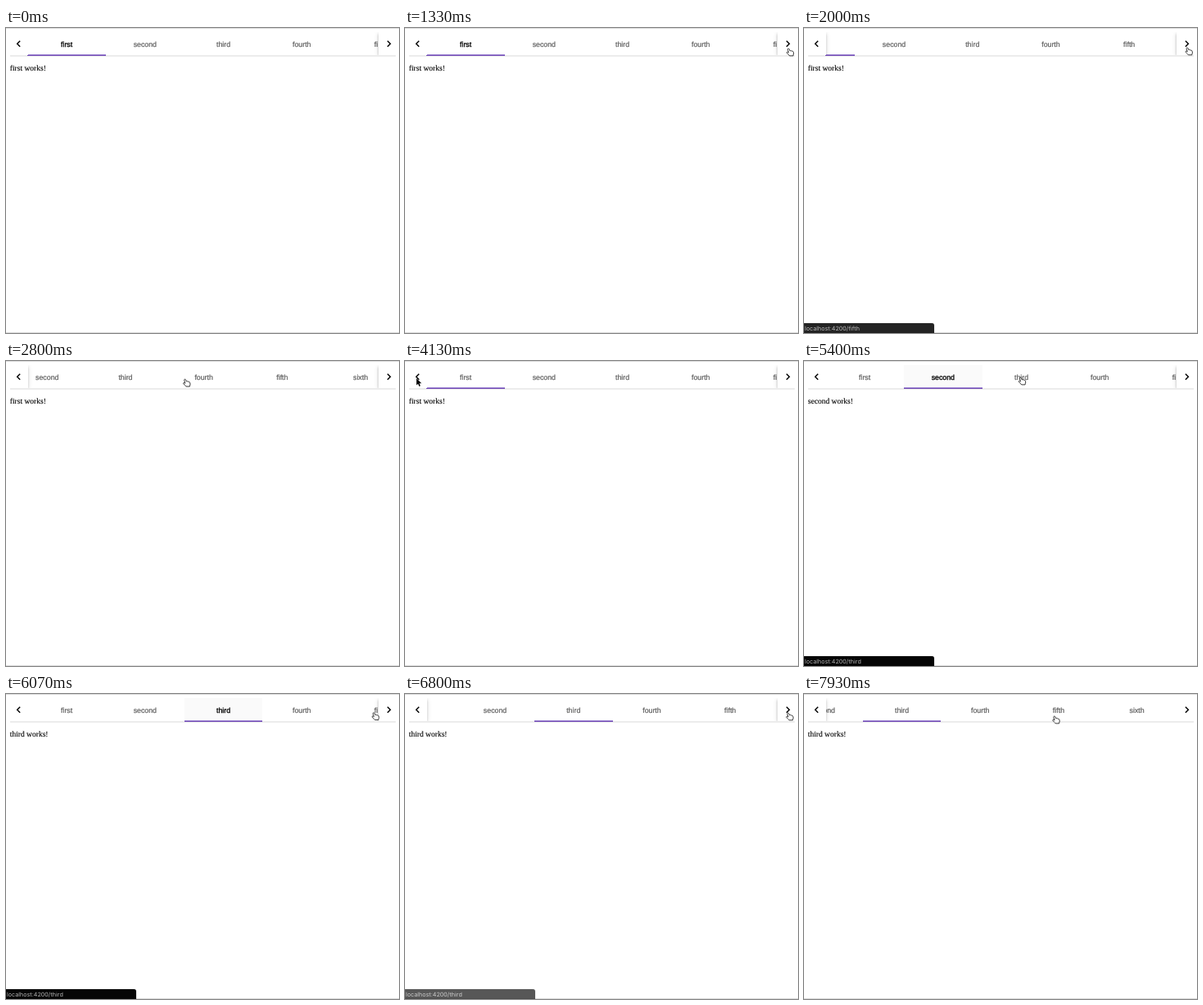
Animation, 480 px wide and 372 px high, one loop 8 s. Source, as an HTML page:

```html
<!DOCTYPE html>
<html lang="en">
<head>
<meta charset="utf-8">
<title>Scrolling tabs</title>
<style>
html, body { margin: 0; width: 100%; height: 100%; overflow: hidden; background: #fff; }
body { position: relative; text-rendering: geometricPrecision; }
body > div, svg, .tab, #ink { position: absolute; }
.rule { left: 0; width: 480px; height: 1px; background: #dcdcdc; }
#header { left: 5px; top: 5px; width: 471px; height: 30px; overflow: hidden; }
#header::after { content: ""; position: absolute; left: 0; right: 0; bottom: 0; height: 2px; background: #ececec; }
#view { position: absolute; left: 21.3px; top: 0; width: 428px; height: 29px; overflow: hidden; z-index: 1; }
#list { position: absolute; left: 0; top: 0; height: 29px; }
.tab { top: 0; width: 95.7px; height: 28px; text-align: center; color: #5e5e5e;
  font: 8.8px/30px "Liberation Sans", Arial, sans-serif; -webkit-text-stroke: .22px; }
.tab.focus { color: #000; -webkit-text-stroke: .32px; }
.tab.tint { background: #fafafa; }
#ink { left: 0; top: 27px; width: 95.7px; height: 2px; background: linear-gradient(#a58fd5 50%, #7048b5 50%); }
.pager { position: absolute; top: 0; width: 21.5px; height: 28px; background: #fff; z-index: 2; clip-path: inset(0 -8px); }
.pager.raised { box-shadow: 0 1.2px 2.4px -.6px rgba(0,0,0,.2), 0 2.4px 3px rgba(0,0,0,.14), 0 .6px 6px rgba(0,0,0,.12); }
#prev { left: 0; }
#next { right: 0; }
#art { left: 0; top: 0; z-index: 5; }
#page { left: 4.8px; top: 43.6px; font: 9.5px/12px "Liberation Serif", "Times New Roman", serif; color: #000;
  -webkit-text-stroke: .12px; white-space: pre; }
#status { left: 0; top: 360px; width: 159px; height: 12px; border-radius: 0 3px 0 0; background: #050505;
  box-shadow: 0 0 1px rgba(0,0,0,.5); color: #b4b4b4; font: 7.2px/13px Inter, "Open Sans", sans-serif; text-indent: 1px; z-index: 3; }
</style>
</head>
<body>
<div class="rule" style="top:0"></div>
<div class="rule" style="top:371px"></div>
<div id="header">
  <div id="view"><div id="list"><div id="ink"></div></div></div>
  <div id="prev" class="pager"></div>
  <div id="next" class="pager"></div>
</div>
<div id="page"></div>
<div id="status"></div>
<svg id="art" width="480" height="372">
  <g fill="none" stroke="#000" stroke-width="1.45">
    <path d="M17.2 15.7L13.7 19.2L17.2 22.7"/>
    <path d="M465.9 15.7L469.4 19.2L465.9 22.7"/>
  </g>
  <g id="cursor">
    <path id="hand" transform="translate(-3 0)" fill="#fff" stroke="#222" stroke-width=".9" stroke-linejoin="round"
      d="M3 5.2L1.9 1.9Q1.7.8 2.5.6Q3.4.4 3.8 1.3L4.6 3.3Q5.4 2.7 6 3.4Q6.9 2.9 7.4 3.8Q8.5 3.6 8.8 4.7L9.2 6.4Q9.2 7.8 8.6 8.4V9.4H4.2Q3.4 8.4 2.5 7.6L.9 5.9Q.5 5 1.3 4.8Q2.1 4.7 3 5.6Z"/>
    <path id="arrow" fill="#000" stroke="#fff" stroke-width=".7" paint-order="stroke"
      d="M0 0V8.6L2 6.8L3.3 9.9L4.8 9.3L3.5 6.3H6.2Z"/>
  </g>
</svg>
<script>
const LOOP = 8000, TICK = 1000 / 15, TAB = 95.7, STEP = 59.8, MAX = 146;
const names = ["first", "second", "third", "fourth", "fifth", "sixth"];
const $ = id => document.getElementById(id);
const clamp = (v, lo, hi) => Math.min(hi, Math.max(lo, v));
const part = (t, from, to) => clamp((t - from) / (to - from), 0, 1);
const easeOut = p => 1 - (1 - p) ** 2.3;
const easeBoth = p => p * p * (3 - 2 * p);

const moves = [
  { from: 130, to: 930, x: 438, y: 24 },
  { from: 940, to: 1330, x: 468.5, y: 24.5 },
  { from: 1930, to: 2200, x: 468, y: 22.5 },
  { from: 2530, to: 3470, x: 14, y: 21 },
  { from: 4200, to: 4530, x: 167, y: 22 },
  { from: 4670, to: 5130, x: 264.5, y: 19.5 },
  { from: 5600, to: 6330, x: 468, y: 22.5 },
  { from: 7600, to: 7930, x: 306, y: 26.5 }
];
const presses = [
  { at: 0, tab: 0 }, { at: 1730, dir: 1 }, { at: 2330, dir: 1 },
  { at: 3600, dir: -1 }, { at: 4060, dir: -1 },
  { at: 4570, tab: 1 }, { at: 5460, tab: 2 },
  { at: 6470, dir: 1 }, { at: 7000, dir: 1 }, { at: 7530, dir: 1 }
];
const hints = [
  { link: "fifth", from: 1400, to: 1910 },
  { link: "second", from: 4600, to: 5190 },
  { link: "third", from: 5060, to: 6650 }
];

const tabs = names.map((name, i) => {
  const tab = document.createElement("div");
  tab.className = "tab";
  tab.textContent = name;
  tab.style.left = i * TAB + "px";
  $("list").insertBefore(tab, $("ink"));
  return tab;
});

function pointer(t) {
  let x = 268, y = 264;
  for (const m of moves) {
    const p = easeOut(part(t, m.from, m.to));
    x += (m.x - x) * p;
    y += (m.y - y) * p;
  }
  return [x, y];
}

// The press takes the focus; scrolling follows one tick later.
function tabState(t) {
  const s = { scroll: 0, active: 0, focus: -1, ink: 0 };
  for (const { at, tab, dir } of presses) {
    if (t < at) break;
    s.focus = tab ?? -1;
    if (dir && t >= at + TICK) s.scroll = clamp(s.scroll + dir * STEP, 0, MAX);
    if (tab !== undefined) {
      s.active = tab;
      s.ink += (tab - s.ink) * easeBoth(part(t, at, at + 480));
    }
  }
  return s;
}

function drawStatus(t) {
  const hint = hints.find(h => t < h.to + 270) || hints[0];
  const last = hint.link === "second" && t >= hint.to ? hints[2] : hint;
  const shown = part(t, last.from, last.from + 130) * (1 - part(t, last.to, last.to + 270) ** 2);
  $("status").textContent = "localhost:4200/" + last.link;
  $("status").style.opacity = shown;
}

function draw(ms) {
  const t = Math.floor((ms + 5) / TICK) * TICK + 5;
  const { scroll, active, focus, ink } = tabState(t);

  $("list").style.left = -scroll + "px";
  tabs.forEach((tab, i) => {
    tab.classList.toggle("focus", i === focus);
    tab.classList.toggle("tint", i === focus && i > 0);
  });
  $("ink").style.left = ink * TAB + "px";
  $("prev").classList.toggle("raised", scroll > 0);
  $("next").classList.toggle("raised", scroll < MAX);
  $("page").textContent = names[active] + " works!";
  drawStatus(t);

  const [x, y] = pointer(t);
  const idle = y > 34 || (x < 26 && scroll === 0) || (x > 454 && scroll === MAX);
  $("cursor").setAttribute("transform", `translate(${x} ${y})`);
  $("cursor").style.display = t < 130 ? "none" : "";
  $("arrow").style.display = idle ? "" : "none";
  $("hand").style.display = idle ? "none" : "";
}

const start = performance.now();
function loop() {
  draw((performance.now() - start) % LOOP);
  requestAnimationFrame(loop);
}
loop();
</script>
</body>
</html>
```
